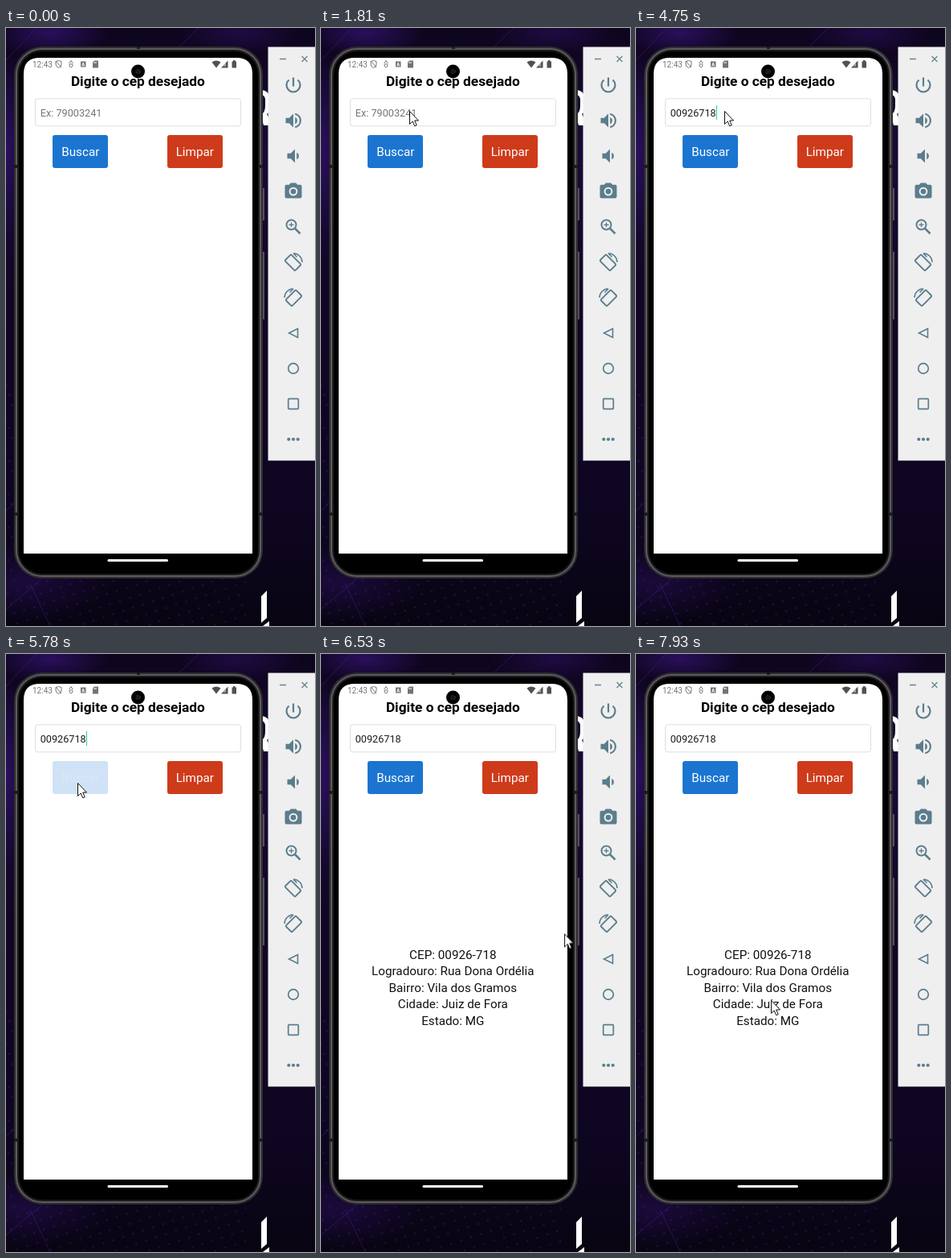
An HTML page for the animation above (8000 ms loop, 385 by 743 pixels).

```html
<!DOCTYPE html>
<html lang="pt-BR">
<head>
<meta charset="utf-8">
<title>Busca de CEP</title>
<style>
  html, body { margin: 0; width: 100%; height: 100%; overflow: hidden; background: #0b0517; }
  #stage { position: relative; width: 385px; height: 743px; overflow: hidden; font-family: Roboto, sans-serif; }
  svg { position: absolute; left: 0; top: 0; display: block; }
  svg text { font-family: Roboto, sans-serif; }
  .mid { text-anchor: middle; }
  .icons { fill: #5b7d8d; stroke: none; }
  .line { fill: none; stroke: #5b7d8d; }

  .field { position: absolute; left: 42.7px; top: 96px; height: 18px; font-size: 12.7px; line-height: 19px; white-space: pre; }
  .hint { color: #747474; animation: hint 8s step-end infinite; }
  .entry { display: flex; color: #1c1c1c; }
  .typed { width: 0; overflow: hidden; animation: type 8s step-end infinite; }
  .caret { width: 1.5px; height: 18px; background: #20cdb8; animation: blink 8s step-end infinite; }
  #search > * { animation: press 8s linear infinite; }
  #result { animation: result 8s step-end infinite; }
  #cursor { animation: show 8s step-end infinite, move 8s linear infinite; }

  @keyframes hint { 0% { opacity: 1 } 31.05%, 100% { opacity: 0 } }
  @keyframes type {
    0% { width: 0 } 31.05% { width: 1ch } 37.8% { width: 2ch } 41.9% { width: 3ch }
    45.15% { width: 4ch } 50.15% { width: 5ch } 54.3% { width: 6ch }
    55.9% { width: 7ch } 59.3%, 100% { width: 8ch }
  }
  @keyframes blink {
    0% { opacity: 0 } 15.9% { opacity: 1 } 22.55% { opacity: 0 } 28.55% { opacity: 1 }
    65.3% { opacity: 0 } 71.4% { opacity: 1 } 74.5%, 100% { opacity: 0 }
  }
  @keyframes press {
    0%, 70.5% { opacity: 1; animation-timing-function: ease-in-out }
    72%, 72.3% { opacity: .2; animation-timing-function: ease-in-out }
    75.4%, 100% { opacity: 1 }
  }
  @keyframes result { 0% { opacity: 0 } 74.5%, 100% { opacity: 1 } }
  @keyframes show { 0% { opacity: 0 } 1.38%, 100% { opacity: 1 } }
  @keyframes move {
    0%, 1.4% { transform: translate(268px, 593px) }
    3% { transform: translate(180px, 470px) }
    5% { transform: translate(90px, 330px) }
    6.6% { transform: translate(45px, 225px) }
    8.5% { transform: translate(60px, 140px) }
    10% { transform: translate(95px, 112px) }
    11% { transform: translate(108px, 106px) }
    11.8%, 66.2% { transform: translate(110px, 103px); animation-timing-function: ease-in-out }
    69.5%, 75.5% { transform: translate(89px, 160px); animation-timing-function: ease-in }
    78% { transform: translate(180px, 215px) }
    80.5% { transform: translate(285px, 300px) }
    81.7% { transform: translate(304px, 350px) }
    83% { transform: translate(290px, 410px) }
    85.1% { transform: translate(227px, 441px) }
    88.6%, 89.1% { transform: translate(153px, 460px) }
    90.8% { transform: translate(98px, 445px) }
    92.2% { transform: translate(104px, 405px) }
    93.5% { transform: translate(140px, 396px) }
    95% { transform: translate(164px, 418px) }
    95.8% { transform: translate(158px, 432px) }
    99%, 100% { transform: translate(168px, 430px) }
  }
</style>
</head>
<body>
<div id="stage">
  <svg width="385" height="743" viewBox="0 0 385 743">
    <defs>
      <linearGradient id="night" x2="0" y2="1">
        <stop offset="0" stop-color="#0d051c"/>
        <stop offset=".2" stop-color="#190937"/>
        <stop offset=".45" stop-color="#110625"/>
        <stop offset=".8" stop-color="#0f0622"/>
        <stop offset="1" stop-color="#080411"/>
      </linearGradient>
      <radialGradient id="glow">
        <stop offset="0" stop-color="#3d1687" stop-opacity=".8"/>
        <stop offset="1" stop-color="#3d1687" stop-opacity="0"/>
      </radialGradient>
      <pattern id="dots" width="13" height="13" patternUnits="userSpaceOnUse" patternTransform="rotate(-18)">
        <circle cx="6" cy="6" r="1.300" fill="#45209a" fill-opacity=".35"/>
      </pattern>
    </defs>

    <!-- wallpaper -->
    <rect width="385" height="743" fill="url(#night)"/>
    <ellipse cx="290" cy="6" rx="80" ry="26" fill="url(#glow)" opacity=".45"/>
    <ellipse cx="55" cy="6" rx="75" ry="28" fill="url(#glow)" opacity=".75"/>
    <ellipse cx="0" cy="150" rx="26" ry="120" fill="url(#glow)" opacity=".6"/>
    <ellipse cx="20" cy="690" rx="110" ry="50" fill="url(#glow)" opacity=".4"/>
    <path d="M0 430H14V684H300V743H0Z" fill="url(#dots)"/>
    <path d="M0 40L38 0M215 24L240 0M0 600L12 588M0 722L44 685M30 690L55 743" stroke="#5426a4" stroke-opacity=".4"/>
    <g fill="#fff">
      <path d="M319 77Q325 78 327 82V105L325 107 327 111V121H321L319 113V107Q323 104 323 96V88Q322 84 319 83Z"/>
      <path d="M318 706L325 699V733L318 739ZM320 743L328 737V743Z"/>
    </g>

    <!-- phone -->
    <path d="M320.500 199V239M320.500 278V362" stroke="#55505c" stroke-width="3"/>
    <rect x="10" y="23" width="310" height="661" rx="35" fill="#2e2d2f"/>
    <rect x="13" y="26" width="304" height="655" rx="32" fill="#1b1a1c" stroke="#5c5a5c" stroke-width="2"/>
    <path d="M10 172h4M316 172h4M10 604h4M316 604h4M165 23v3" stroke="#1c1c1c" stroke-width="4"/>
    <rect x="16" y="29" width="298" height="649" rx="29" fill="#000"/>
    <path d="M22 653V57Q22 37 42 37H287Q307 37 307 57V653Z" fill="#fff"/>
    <rect x="126.500" y="660" width="75.500" height="3" rx="1.500" fill="#fff"/>

    <!-- status bar -->
    <g fill="#737373">
      <text x="33" y="48.500" font-size="10">12:43</text>
      <path d="M93 41.500h6.500v7h-6.500zM108 42.500l2-2h5v9h-7z"/>
      <path d="M94.700 47.500l1.500-4.500 1.500 4.500m-2.500-1.500h2" fill="none" stroke="#fff" stroke-width=".9"/>
      <path d="M110 42v2M112 42v2" stroke="#fff"/>
      <path d="M62 41.500l3.500-1 3.500 1v3.500q0 3-3.500 4.500-3.500-1.500-3.500-4.500zM62 41l7 8" fill="none" stroke="#737373"/>
      <path d="M81 40.500l2 3-2 2-2-2zM79 45q0 4 2 4t2-4" fill="none" stroke="#737373"/>
    </g>
    <path d="M256.500 42.500Q262 38.500 267.500 42.500L262 49.500ZM276.500 40.500V49.500H268ZM281.500 41.500h1.500v-1.500h2.500v1.500h1.500v8h-5.500z" fill="#515151"/>
    <path d="M270 47.500h4v-4z" fill="#aaa"/>

    <!-- form -->
    <text class="mid" x="164.300" y="72" font-size="17.300" font-weight="700" fill="#000">Digite o cep desejado</text>
    <circle cx="164.500" cy="54" r="8.500" fill="#000"/>
    <circle cx="164.500" cy="54" r="2.800" fill="#10161a" stroke="#303638" stroke-dasharray="3 2"/>
    <rect x="36.500" y="87.800" width="256" height="34" rx="3" fill="#fff" stroke="#dedede"/>
    <g id="search">
      <rect x="58" y="133" width="69" height="41" rx="3" fill="#1b75d0"/>
      <text class="mid" x="92.800" y="159" font-size="15.250" fill="#fff">Buscar</text>
    </g>
    <rect x="201" y="133" width="69" height="41" rx="3" fill="#ce3b1b"/>
    <text class="mid" x="235.300" y="159" font-size="15.250" fill="#fff">Limpar</text>
    <g id="result" class="mid" font-size="15.250" fill="#111">
      <text x="164.300" y="378.500">CEP: 00926-718</text>
      <text x="164.300" y="399">Logradouro: Rua Dona Ordélia</text>
      <text x="164.300" y="419.700">Bairro: Vila dos Gramos</text>
      <text x="164.300" y="440.200">Cidade: Juiz de Fora</text>
      <text x="164.300" y="460.700">Estado: MG</text>
    </g>

    <!-- emulator toolbar -->
    <rect x="326.500" y="23.500" width="59" height="514" fill="#efefef"/>
    <path d="M341 38.500h8M368.500 35l7 7m0-7l-7 7" fill="none" stroke="#69838f" stroke-width="1.300"/>
    <g class="icons">
      <path class="line" stroke-width="2.200" transform="translate(358 71)" d="M0-9.500V1.500M-5.500-6.500A8.500 8.500 0 1 0 5.500-6.500"/>
      <g transform="translate(358 115)">
        <path d="M-9.500-3.200h4.300L0-8.500V8.500L-5.200 3.200h-4.300zM2.200-4.300Q5-3 5 0T2.200 4.300z"/>
        <path class="line" stroke-width="2.200" d="M2.200-8.300A8.500 8.500 0 0 1 2.200 8.300"/>
      </g>
      <path transform="translate(358 159)" d="M-7.500-3.200h4.300L2-8.500V8.500L-3.200 3.200h-4.300zM4.200-4.300Q7-3 7 0T4.200 4.300z"/>
      <g transform="translate(358 202.500)">
        <path d="M-3.200-10h6.400l2 2.200h3.300q2 0 2 2V7q0 2-2 2h-17q-2 0-2-2V-5.800q0-2 2-2h3.300z"/>
        <circle cy=".6" r="4.400" stroke="#efefef" stroke-width="2"/>
      </g>
      <g class="line" stroke-width="2" transform="translate(358 247)">
        <circle cx="-2.500" cy="-2.500" r="6"/>
        <path d="M2 2l6.500 6.500" stroke-width="2.500"/>
        <path d="M-5.500-2.500h6M-2.500-5.500v6" stroke-width="1.300"/>
      </g>
      <g id="turn" class="line" transform="translate(358 291)" stroke-width="1.900">
        <rect x="-5.500" y="-9" width="11" height="18" rx="1.500" transform="translate(-.5 .5) rotate(-45)"/>
        <path d="M0-11A11 11 0 0 1 11 0M0-11l4.500 4.500" stroke-width="1.500"/>
      </g>
      <use href="#turn" transform="matrix(-1 0 0 1 716 44)"/>
      <path class="line" stroke-width="1.600" d="M363.500 373.500v11l-11-5.500z"/>
      <circle class="line" stroke-width="1.700" cx="358" cy="423" r="6.300"/>
      <rect class="line" stroke-width="1.700" x="351.700" y="460.700" width="12.600" height="12.600" rx="1"/>
      <circle cx="352.300" cy="511" r="2.100"/>
      <circle cx="358" cy="511" r="2.100"/>
      <circle cx="363.700" cy="511" r="2.100"/>
    </g>
  </svg>

  <div class="field hint">Ex: 79003241</div>
  <div class="field entry"><span class="typed">00926718</span><i class="caret"></i></div>

  <svg width="385" height="743" viewBox="0 0 385 743">
    <path id="cursor" d="M.5 .5V16.500L4.200 13 6.700 18.800 9.200 17.700 6.700 12H11.500Z" fill="#fff" stroke="#111"/>
  </svg>
</div>
</body>
</html>
```
